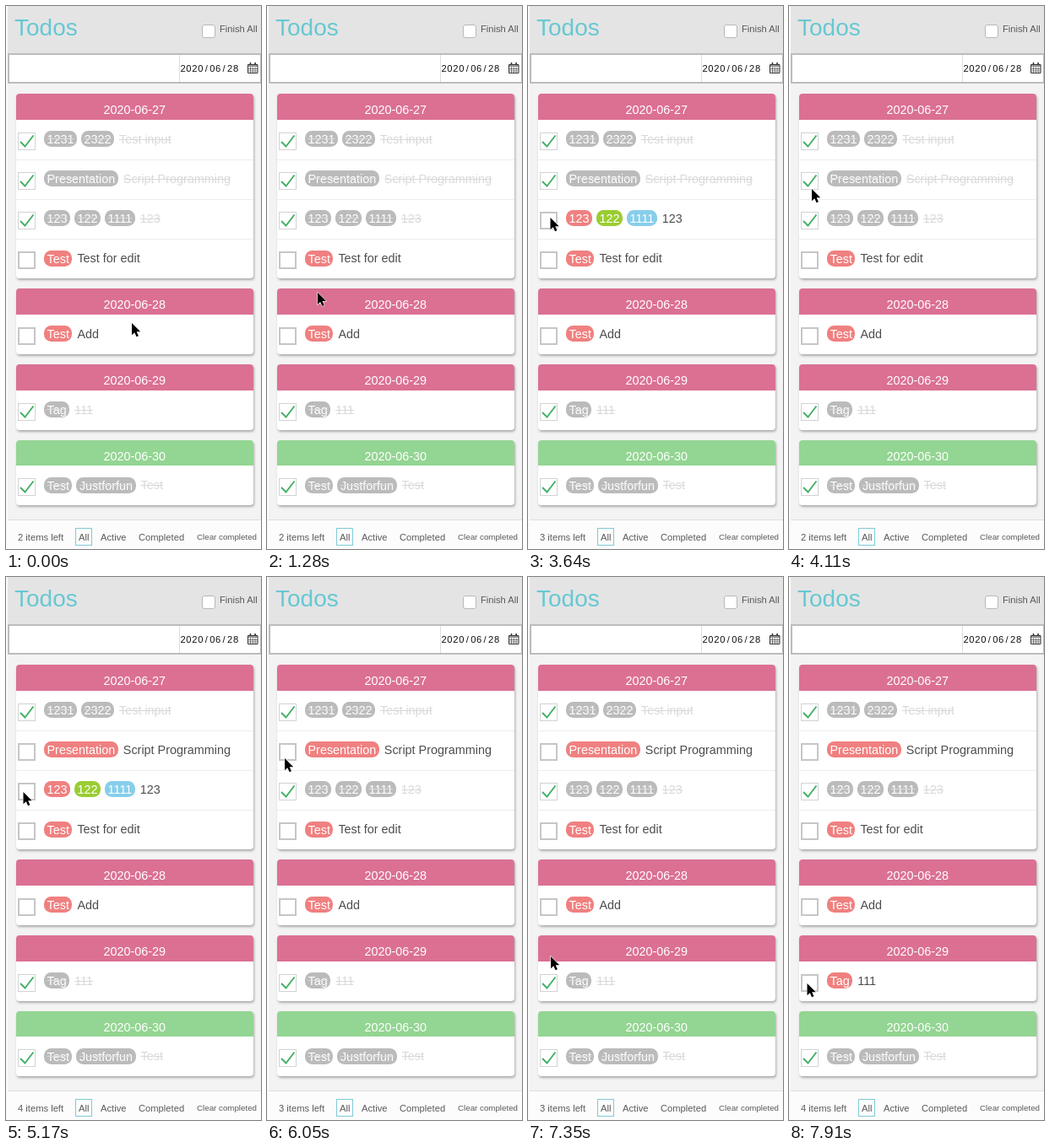
These frames come from a looping animation (302x644 px, 8000 ms). An HTML page:

```html
<!DOCTYPE html>
<html lang="en">
<head>
<meta charset="utf-8">
<title>Todos</title>
<style>
  * { box-sizing: border-box; margin: 0; }
  html, body { width: 100%; height: 100%; overflow: hidden; background: #fafafa; }
  body { position: relative; font: 11.2px "Liberation Sans", Arial, sans-serif; color: #5a5a5a; }
  body * { position: absolute; white-space: nowrap; }
  .app { left: 2px; top: 0; width: 300px; height: 644px; background: #f3f3f3; }
  header { left: 2px; top: 0; width: 300px; height: 57px; background: #e4e4e4; }
  h1 { left: 8px; top: 6px; font-size: 28px; font-weight: 400; line-height: 40px; color: #67c8d3; }
  .all { left: 230px; top: 22px; width: 16px; height: 16px; background: #fff; border: 1px solid #b8b8b8; border-radius: 3px; }
  .entry { left: 2px; top: 56px; width: 301px; height: 36px; background: #fff; border: 2px solid #bcbcbc; }
  .date { left: 201px; top: 0; width: 96px; height: 32px; border-left: 1px solid #ddd; font-size: 11.2px; line-height: 32px; color: #111; }
  .date b { top: 0; width: 7px; text-align: center; font-weight: 400; }
  .card { left: 12px; width: 280.5px; background: #fff; border-radius: 4px; box-shadow: 1px 2px 3px rgba(0,0,0,.3); overflow: hidden; font-size: 14.4px; }
  .card h2 { left: 0; top: 0; width: 100%; height: 30.5px; font-size: 14.4px; font-weight: 400; line-height: 38px; text-align: center; color: #fff; }
  .row { left: 0; width: 100%; height: 47.2px; line-height: 47.2px; color: #4d4d4d; }
  .row + .row { border-top: 1px solid #ededed; }
  .row p { left: 33px; top: 0; }
  .row + .row p { top: -1px; }
  .row span { position: static; margin-left: 1px; }
  .row .tag { margin: 0 5px 0 0; padding: 1.5px 3.5px; border-radius: 8.5px; color: #fff; background: var(--tint); }
  .box { left: 2px; top: 15px; width: 21px; height: 21px; border: 2px solid #c6c6c6; }
  .row + .row .box { top: 14px; }
  .row svg { left: 2px; top: 15px; display: none; }
  .row + .row svg { top: 14px; }
  .done svg { display: block; }
  .done .box { border: 1px solid #d2d2d2; }
  .done p { color: #d9d9d9; text-decoration: line-through #d9d9d9; }
  .done .tag { background: #bbb; }
  footer { left: 2px; top: 609px; width: 300px; height: 35px; background: #fcfcfc; border-top: 1px solid #dedede; line-height: 40px; }
  footer .on { left: 80px; top: 9px; width: 20px; height: 21px; border: 1px solid #7fcbd5; }
  #cursor { left: 0; top: 0; }
</style>
</head>
<body>
<div class="app"></div>
<header>
  <h1>Todos</h1>
  <i class="all"></i>
  <span style="left:251px;top:17px;line-height:20px">Finish All</span>
</header>
<div class="entry">
  <div class="date" id="date"></div>
  <svg style="left:282px;top:8px" width="13" height="15" fill="none" stroke="#333">
    <path d="M.5 3.5h11.5v10h-11.5zM.5 5h11.5" stroke-width="1"/>
    <path d="M3.5 6v7M6.3 6v7M9.1 6v7M1 8.5h11M1 11h11" stroke-width=".6"/>
    <path d="M3.5 1v3M9.1 1v3" stroke-width="1.6"/>
  </svg>
</div>
<main id="list" style="left:0;top:0"></main>
<footer>
  <span id="left" style="left:12px"></span>
  <i class="on"></i>
  <span style="left:84px">All</span>
  <span style="left:110px">Active</span>
  <span style="left:155px">Completed</span>
  <span style="left:224px;font-size:9.75px">Clear completed</span>
</footer>
<svg id="cursor" width="14" height="20">
  <path d="M1 1V15.2L4.3 12.2 6.5 17.2 8.9 16.2 6.7 11.3H11.2Z" stroke="#fff" stroke-width="1.2" paint-order="stroke" stroke-linejoin="round"/>
</svg>
<script>
const LOOP = 8000;
const CORAL = '#f08080', LIME = '#9acd32', SKY = '#87ceeb';
const PINK = '#db7093', GREEN = '#93d592';
const todo = (text, tags, done, toggles = []) => ({ text, tags, done, toggles });

const cards = [
  ['2020-06-27', PINK, [
    todo('Test input', [['1231', CORAL], ['2322', CORAL]], true),
    todo('Script Programming', [['Presentation', CORAL]], true, [4450]),
    todo('123', [['123', CORAL], ['122', LIME], ['1111', SKY]], true, [3640, 3760, 5170, 5690]),
    todo('Test for edit', [['Test', CORAL]], false)
  ]],
  ['2020-06-28', PINK, [todo('Add', [['Test', CORAL]], false)]],
  ['2020-06-29', PINK, [todo('111', [['Tag', CORAL]], true, [7910])]],
  ['2020-06-30', GREEN, [todo('Test', [['Test', CORAL], ['Justforfun', CORAL]], true)]]
];

// Pointer waypoints: time, x, y
const path = [
  [0, 148, 375], [810, 148, 375], [1050, 112, 467], [1280, 59, 339], [1330, 54, 333],
  [1510, 54, 333], [2110, 26, 252], [2230, 26, 252], [2320, 26, 254.5],
  [3070, 26, 254.5], [3190, 25.5, 250], [3780, 25.5, 250], [4110, 26, 216], [4340, 22, 208],
  [4720, 22, 208], [4990, 19.5, 254], [5370, 19.5, 254], [5510, 20.5, 256],
  [5700, 20.5, 256], [6050, 20, 214], [6200, 20, 214], [6350, 99, 406], [6530, 99, 406],
  [6640, 107, 430], [6880, 37, 542], [7010, 33, 582], [7350, 26, 449], [7390, 26, 449],
  [7760, 20.5, 481], [LOOP, 20.5, 481]
];

function add(parent, tag, className = '', text = '') {
  const el = document.createElement(tag);
  el.className = className;
  el.textContent = text;
  return parent.appendChild(el);
}

const $ = id => document.getElementById(id);

[...'2020/06/28'].forEach((char, i) => {
  add($('date'), 'b', '', char).style.left = i * 6.95 + 'px';
});

let cardTop = 104;
for (const [date, color, todos] of cards) {
  const card = add($('list'), 'section', 'card');
  const height = 30.5 + todos.length * 47.2;
  card.style.cssText = `top:${cardTop}px;height:${height}px`;
  todos.forEach((item, i) => {
    const row = item.row = add(card, 'div', 'row');
    row.style.top = 30.5 + i * 47.2 + 'px';
    add(row, 'i', 'box');
    row.insertAdjacentHTML('beforeend',
      '<svg width="21" height="21"><path d="M3 11L8.5 16.5 18.5 3.5" fill="none" stroke="#43b066" stroke-width="1.9"/></svg>');
    const label = add(row, 'p');
    for (const [name, tint] of item.tags)
      add(label, 'span', 'tag', name).style.setProperty('--tint', tint);
    add(label, 'span', '', item.text);
  });
  add(card, 'h2', '', date).style.background = color;
  cardTop += height + 12;
}

const items = cards.flatMap(card => card[2]);

const slope = (i, axis) => (path[i + 1][axis] - path[i][axis]) / (path[i + 1][0] - path[i][0]);

// Monotone tangents: smooth through waypoints, still at rests and turns
function tangent(i, axis) {
  if (i === 0 || i === path.length - 1) return 0;
  const a = slope(i - 1, axis), b = slope(i, axis);
  return a * b > 0 ? 2 * a * b / (a + b) : 0;
}

function position(t, axis) {
  const i = path.findIndex((p, n) => t < path[n + 1][0]);
  const span = path[i + 1][0] - path[i][0];
  const u = (t - path[i][0]) / span, v = 1 - u;
  return v * v * (1 + 2 * u) * path[i][axis] + u * u * (1 + 2 * v) * path[i + 1][axis]
    + span * u * v * (v * tangent(i, axis) - u * tangent(i + 1, axis));
}

function draw() {
  const t = performance.now() % LOOP;
  let remaining = 0;
  for (const { row, done, toggles } of items) {
    const flips = toggles.filter(time => time <= t).length;
    const isDone = done !== (flips % 2 === 1);
    row.classList.toggle('done', isDone);
    if (!isDone) remaining++;
  }
  $('left').textContent = `${remaining} items left`;
  $('cursor').style.transform = `translate(${position(t, 1)}px, ${position(t, 2)}px)`;
  requestAnimationFrame(draw);
}
draw();
</script>
</body>
</html>
```
